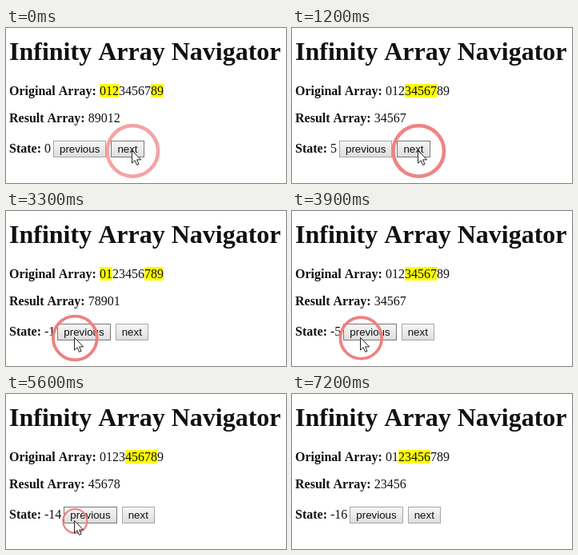
These frames come from a looping animation (350 px wide and 194 px high, 8 s). An HTML page:

```html
<!DOCTYPE html>
<html lang="en">
<head>
<meta charset="utf-8">
<title>Infinity Array Navigator</title>
<style>
  html, body { margin: 0; width: 100%; height: 100%; overflow: hidden; background: #fff; }
  body {
    position: relative; color: #111; font: 16px/18px "Liberation Serif", "Times New Roman", serif;
    font-kerning: none; font-variant-ligatures: none;
  }
  h1, p { position: absolute; left: 4px; margin: 0; white-space: nowrap; }
  h1 { top: 11px; font-size: 32px; line-height: 37px; }
  .source { top: 70px; }
  .result { top: 104px; }
  .state { top: 141px; }
  .on { background: linear-gradient(#ff0, #ff0) top / 100% 17px no-repeat; }
  .button {
    display: inline-block; box-sizing: border-box; height: 21px; margin: 0 3px; padding: 2px 7px;
    border: 1px solid #a6a6a6; background: linear-gradient(#f6f6f6, #dedede);
    font: 13.333px/15px "Liberation Sans", Arial, sans-serif; vertical-align: baseline;
  }
  .button.hover { border-color: #777; }
  svg { position: absolute; left: 0; top: 0; }
</style>
</head>
<body>
<h1>Infinity Array Navigator</h1>
<p class="source"><b>Original Array:</b> <span id="digits"></span></p>
<p class="result"><b>Result Array:</b> <span id="result"></span></p>
<p class="state"><b>State:</b> <span id="state"></span><span class="button">previous</span><span class="button">next</span></p>
<svg width="350" height="194">
  <g id="rings" fill="none" stroke="#f08080"></g>
  <path id="cursor" d="M.5 .5V16.2L4.1 12.8L6.6 18.4L9 17.4L6.6 11.9H11.6Z" fill="#fff" stroke="#222"/>
</svg>
<script>
const LOOP = 8000, STEP = 100, SIZE = 10;
const RING = { period: 625, growth: 600, radius: 34, fade: 200 };

// Runs of clicks on one button; ripples keep their own slower rhythm.
const bursts = [
  { step: 1, first: 300, period: 200, clicks: 5, ripple: -680, ripples: 3 },
  { step: -1, first: 2400, period: 155, clicks: 17, ripple: 2220, ripples: 4 },
  { step: -1, first: 5300, period: 300, clicks: 4, ripple: 5310, ripples: 1 }
];
const NEXT = { x: 157, y: 153 }, PREVIOUS = { x: 85, y: 158 }, EXIT = { x: 162, y: 40 };
const LEAVE = 6800, GONE = 7200;

const el = id => document.getElementById(id);
const clamp = (v, min, max) => Math.max(min, Math.min(max, v));
const progress = (t, from, to) => clamp((t - from) / (to - from), 0, 1);
const glide = (a, b, k) => ({ x: a.x + (b.x - a.x) * k, y: a.y + (b.y - a.y) * k });
const buttons = document.querySelectorAll('.button');

const digits = Array.from({ length: SIZE }, (_, i) => {
  const span = document.createElement('span');
  span.textContent = i;
  return el('digits').appendChild(span);
});

const ripples = bursts.flatMap(({ ripple, ripples }) =>
  Array.from({ length: ripples }, (_, i) => {
    const circle = document.createElementNS('http://www.w3.org/2000/svg', 'circle');
    return { start: ripple + i * RING.period, circle: el('rings').appendChild(circle) };
  }));

function showState(t) {
  const state = bursts.reduce((sum, { step, first, period, clicks }) =>
    sum + step * clamp(Math.floor((t - first) / period) + 1, 0, clicks), 0);
  const picked = [-2, -1, 0, 1, 2].map(d => ((state + d) % SIZE + SIZE) % SIZE);
  digits.forEach((span, i) => span.classList.toggle('on', picked.includes(i)));
  el('result').textContent = picked.join('');
  el('state').textContent = String(state);
}

function cursorAt(t) {
  return t < LEAVE
    ? glide(NEXT, PREVIOUS, progress(t, 1600, 2000))
    : glide(PREVIOUS, EXIT, progress(t, LEAVE, GONE - STEP));
}

function showCursor(t, { x, y }) {
  el('cursor').setAttribute('transform', `translate(${x} ${y})`);
  el('cursor').style.display = t < GONE ? '' : 'none';
  buttons.forEach(button => {
    const box = button.getBoundingClientRect();
    const inside = x >= box.left && x < box.right && y >= box.top && y < box.bottom;
    button.classList.toggle('hover', inside);
  });
}

function showRipple({ start, circle }, t, { x, y }) {
  const age = t - start;
  const radius = RING.radius * (1 - Math.cos(Math.PI * clamp(age / RING.growth, 0, 1))) / 2;
  const width = radius / 7.5;
  circle.setAttribute('cx', x + 1.3);
  circle.setAttribute('cy', y + 1);
  circle.setAttribute('r', radius - width / 2);
  circle.setAttribute('stroke-width', width);
  circle.setAttribute('opacity', 1 - progress(age, RING.period, RING.period + RING.fade));
}

function draw(now) {
  let t = Math.floor(now % LOOP / STEP) * STEP;
  if (t < 200) t = 0;
  const cursor = cursorAt(t);
  showState(t);
  showCursor(t, cursor);
  ripples.forEach(ripple => showRipple(ripple, t, cursor));
}

const start = performance.now();
function tick() {
  draw(performance.now() - start);
  requestAnimationFrame(tick);
}
tick();
</script>
</body>
</html>
```
